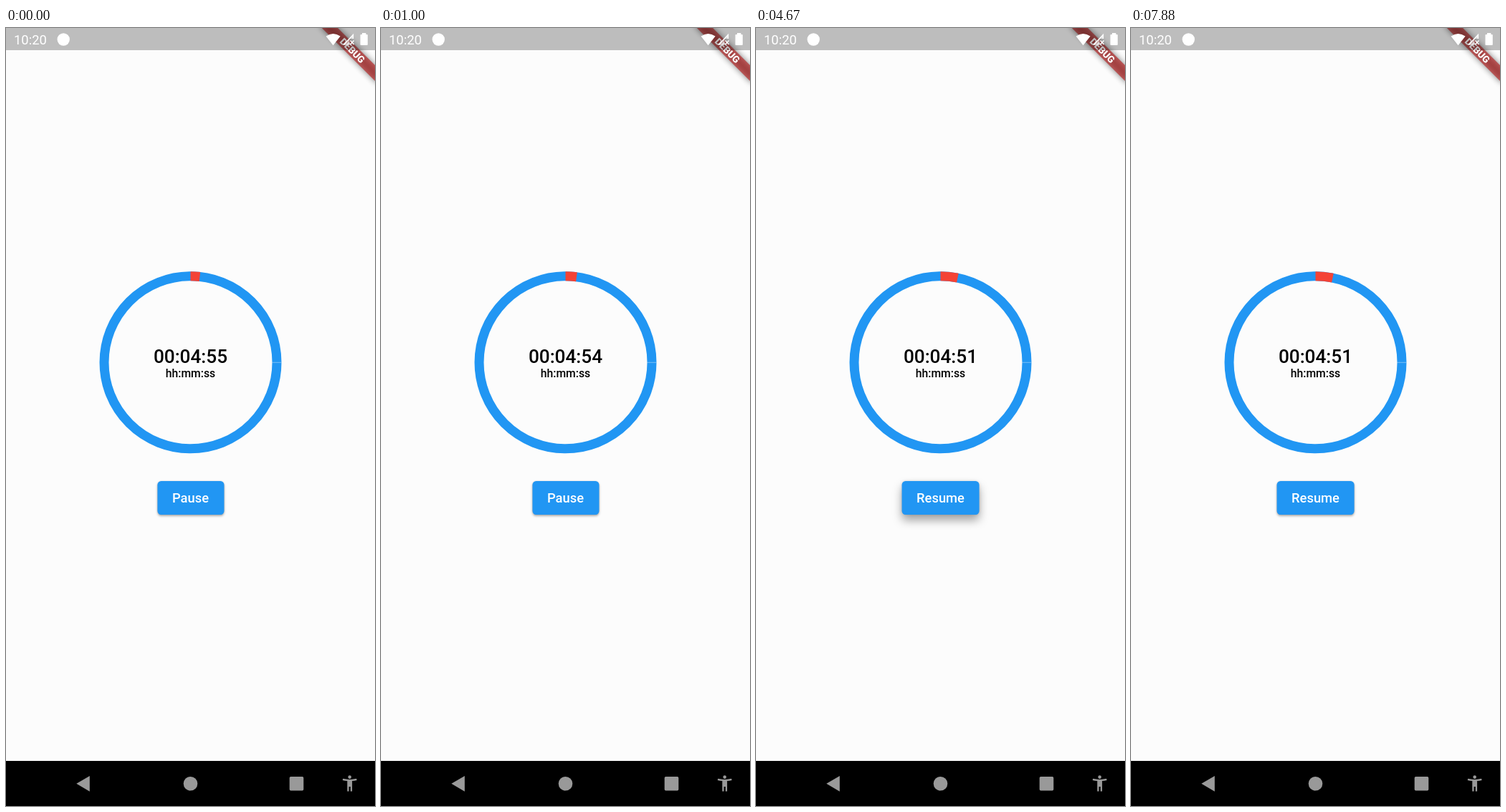
Write an HTML page that moves like this. It is 515 px wide and 1087 px high and loops after 8000 ms.

```html
<!DOCTYPE html>
<html lang="en">
<head>
<meta charset="utf-8">
<title>Countdown timer</title>
<style>
  html, body {
    margin: 0;
    width: 100%;
    height: 100%;
    overflow: hidden;
    background: #fcfcfc;
  }
  #stage {
    position: relative;
    width: 515px;
    height: 1087px;
    overflow: hidden;
    font-family: Roboto, Arial, sans-serif;
  }
  svg {
    position: absolute;
    inset: 0;
    display: block;
  }
  #button {
    position: absolute;
    top: 632.5px;
    left: 257.5px;
    box-sizing: border-box;
    height: 47.2px;
    padding: 0 21px;
    border-radius: 5.2px;
    transform: translateX(-50%);
    background: #2196f3;
    color: #fff;
    font-size: 18.36px;
    font-weight: 500;
    line-height: 47.2px;
    white-space: nowrap;
  }
</style>
</head>
<body>
<div id="stage">
  <div id="button">Pause</div>
  <svg width="515" height="1087" viewBox="0 0 515 1087">
    <defs>
      <filter id="soft" x="-30%" y="-150%" width="160%" height="400%">
        <feGaussianBlur stdDeviation="4"/>
      </filter>
    </defs>

    <!-- Timer ring -->
    <g fill="none" stroke-width="13">
      <circle cx="257.5" cy="467.3" r="120.5" stroke="#2196f3"/>
      <path d="M371.5 467.3h13" stroke="#fcfcfc" stroke-opacity=".4" stroke-width="1"/>
      <circle id="arc" cx="257.5" cy="467.3" r="120.5" stroke="#f44336"
              pathLength="300" transform="rotate(-90 257.5 467.3)"/>
    </g>
    <g font-weight="500" text-anchor="middle" fill="#000">
      <text id="clock" x="257.5" y="468.3" font-size="26.2">00:04:55</text>
      <text x="257.5" y="487.6" font-size="15.7">hh:mm:ss</text>
    </g>

    <!-- Corner banner -->
    <g transform="translate(515 0) rotate(45)">
      <rect x="-56" y="36.7" width="112" height="15.7" fill-opacity=".5" filter="url(#soft)"/>
      <rect x="-56" y="36.7" width="112" height="15.7" fill="#b71c1c" fill-opacity=".63"/>
      <text y="49.3" font-size="13.4" font-weight="900" text-anchor="middle" fill="#fff">DEBUG</text>
    </g>

    <!-- Status bar -->
    <rect width="515" height="31" fill-opacity=".25"/>
    <g fill="#fff">
      <text x="11" y="23" font-size="18.4">10:20</text>
      <circle cx="80.2" cy="16" r="8.7"/>
      <path d="M456.6 24.3L446.6 11.6Q456.6 4.4 466.6 11.6Z"/>
      <path d="M470 24L485 8.2V15H479.5V24Z" fill-opacity=".55"/>
      <path d="M471.5 23.3L484.4 9.6V15M480.5 17.5l5 5.5m0-5.5l-5 5.5"
            fill="none" stroke="#fff" stroke-width="1.5"/>
      <path d="M497 9V7h5.4v2h1.4q1 0 1 1v13q0 1-1 1h-8.3q-1 0-1-1V10q0-1 1-1z"/>
    </g>

    <!-- Navigation bar -->
    <rect y="1024" width="515" height="63"/>
    <g fill="#999">
      <path d="M98.3 1055.8L116.8 1045v21.7z"/>
      <circle cx="257.5" cy="1055.7" r="9.8"/>
      <rect x="395.7" y="1046" width="19.6" height="19.6" rx="1.8"/>
      <circle cx="479.7" cy="1046.6" r="2.3"/>
      <path d="M470.3 1048.8q9.4 2.3 18.8 0l.6 2.2q-3.2.9-6.6 1.1v14.5h-2.3v-6.7h-2.2v6.7h-2.3v-14.5q-3.4-.2-6.6-1.1z"/>
    </g>
  </svg>
</div>
<script>
  const LOOP = 8000;
  const TOTAL = 300;
  const ELAPSED = 5.15;
  const PAUSE_AT = 4400;
  const PRESS_AT = 4220;
  const RELEASE_AT = 4660;

  const byId = id => document.getElementById(id);
  const arc = byId('arc'), clock = byId('clock'), button = byId('button');

  // Smooth 0 to 1 ramp
  const ramp = (t, start, length) => {
    const k = Math.min(1, Math.max(0, (t - start) / length));
    return k * k * (3 - 2 * k);
  };
  const pad = n => String(n).padStart(2, '0');
  const format = s =>
    [Math.floor(s / 3600), Math.floor(s / 60) % 60, s % 60].map(pad).join(':');

  function setText(el, text) {
    if (el.textContent !== text) el.textContent = text;
  }

  function draw(t) {
    const elapsed = ELAPSED + Math.min(t, PAUSE_AT) / 1000;
    arc.setAttribute('stroke-dasharray', `${elapsed} ${TOTAL}`);
    setText(clock, format(Math.ceil(TOTAL - elapsed)));
    setText(button, t < PAUSE_AT ? 'Pause' : 'Resume');

    const lift = ramp(t, PRESS_AT, 200) - ramp(t, RELEASE_AT, 240);
    const height = 2 + 6 * lift;
    button.style.boxShadow =
      `0 ${height}px ${height * 1.6}px rgba(0,0,0,${0.3 + 0.05 * lift}),` +
      `0 0 ${2 + 2 * lift}px rgba(0,0,0,.15)`;
  }

  const start = performance.now();
  function tick() {
    draw((performance.now() - start) % LOOP);
    requestAnimationFrame(tick);
  }
  tick();
</script>
</body>
</html>
```
